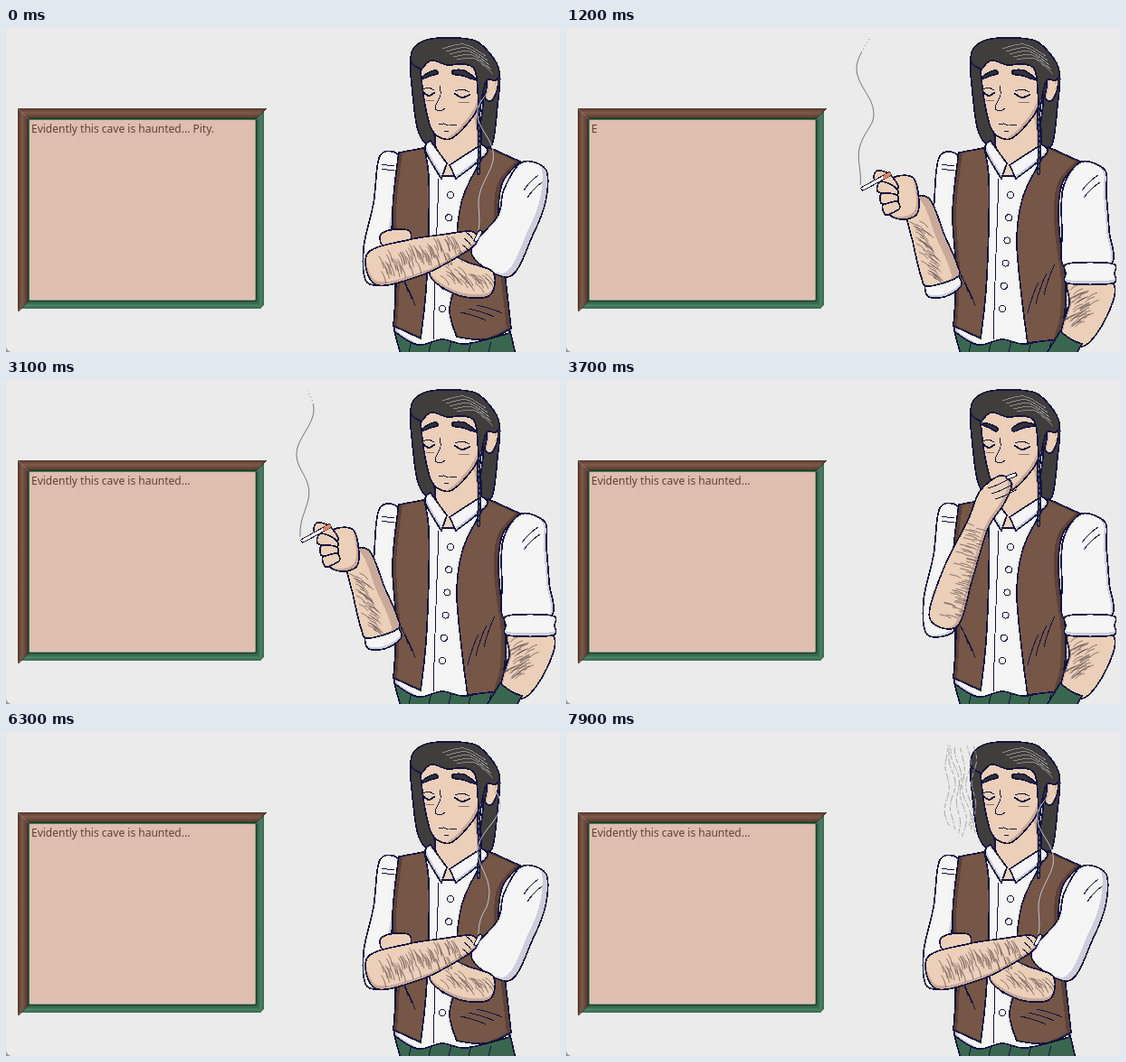
Write an HTML page that moves like this. It is 612 px wide and 359 px high and loops after 8 s.

```html
<!DOCTYPE html>
<html lang="en">
<head>
<meta charset="utf-8">
<title>Haunted cave</title>
<style>
html, body { margin: 0; width: 100%; height: 100%; overflow: hidden; background: #ebebeb; }
svg { display: block; width: 612px; height: 359px; }
#man { fill: none; stroke: #11133f; stroke-linejoin: round; stroke-linecap: round; shape-rendering: crispEdges; }
.smoke { fill: none; }
text { font: 12px "Noto Sans", sans-serif; fill: #643f38; }
</style>
</head>
<body>
<svg viewBox="0 0 612 359">
  <defs>
    <linearGradient id="brown" x2="0" y2="1"><stop stop-color="#54352b"/><stop offset=".4" stop-color="#805a4a"/><stop offset="1" stop-color="#4b2f27"/></linearGradient>
    <linearGradient id="side" href="#brown" x2="1" y2="0"/>
    <linearGradient id="green" x2="0" y2="1"><stop stop-color="#24513b"/><stop offset=".6" stop-color="#4b8062"/><stop offset="1" stop-color="#356a4d"/></linearGradient>
    <linearGradient id="edge" href="#green" x2="1" y2="0"/>
  </defs>
  <path d="M0 353Q1 358 6 359H0Z" fill="#999"/>
  <path d="M276 102L285 92V307L281 311L276 303Z" fill="url(#edge)"/>
  <path d="M25 302H276L282 311H16Z" fill="url(#green)"/>
  <path d="M13 89H288L276 101H25Z" fill="url(#brown)"/>
  <path d="M13 89L25 101V302L13 314Z" fill="url(#side)"/>
  <path d="M14 314L25 302M276 101L288 89" stroke="#2c2a22"/>
  <rect x="24.500" y="100.500" width="252" height="202" rx="2" fill="#3c7d58" stroke="#18382a"/>
  <rect x="26" y="102" width="249.500" height="199.500" rx="1" fill="#dfbdaf"/>
  <text id="say" x="28" y="116"></text>
  <g id="man"></g>
  <path id="plume" class="smoke"/>
  <path id="wisp" class="smoke" stroke="#777" stroke-dasharray="1 3"/>
  <path id="breath" class="smoke" stroke="#a9a9a9" stroke-dasharray="5 2 2 1 8 3"/>
</svg>
<script>
const $ = id => document.getElementById(id);
// Base colour and shade of each material
const paint = {
  skin: ['#ebcfb8', '#c9a99a'], shirt: ['#f5f5f6', '#cdced9'], vest: ['#755647', '#5b4138'],
  hair: ['#403d3d'], pants: ['#3a6650'], brow: ['#343238'], lip: ['#c96e67'],
};

function node(parent, tag, attrs) {
  const e = document.createElementNS('http://www.w3.org/2000/svg', tag);
  for (const k in attrs) e.setAttribute(k, attrs[k]);
  return parent.appendChild(e);
}
const layer = () => node($('man'), 'g', {});

// Smooth line through [x, y, corner] points
function spline(p, closed) {
  const n = p.length;
  const at = i => closed ? p[(i + n) % n] : p[Math.max(0, Math.min(n - 1, i))];
  const slope = (i, k) => at(i)[2] ? 0 : (at(i + 1)[k] - at(i - 1)[k]) / 6;
  let d = `M${p[0][0]} ${p[0][1]}`;
  for (let i = 0; i < (closed ? n : n - 1); i++) {
    const [ax, ay] = at(i), [bx, by] = at(i + 1);
    d += `C${ax + slope(i, 0)} ${ay + slope(i, 1)} ${bx - slope(i + 1, 0)} ${by - slope(i + 1, 1)} ${bx} ${by}`;
  }
  return d + (closed ? 'Z' : '');
}
// "x,y" points; "!" marks a corner
const points = s => s.split(' ').map(q => [...q.replace('!', '').split(',').map(Number), q.endsWith('!')]);

// Fills an outline; the shade is what a copy moved by (dx, dy) leaves bare.
let clips = 0;
function fill(g, name, d, dx = 0, dy = 0) {
  const [main, shade = main] = paint[name], id = 'clip' + clips++;
  node(node(g, 'clipPath', { id }), 'path', { d });
  node(g, 'path', { d, fill: shade, stroke: 'none' });
  const inside = node(g, 'g', { 'clip-path': `url(#${id})` });
  node(inside, 'path', { d, fill: main, stroke: 'none', transform: `translate(${dx} ${dy})` });
  node(g, 'path', { d, 'stroke-width': 1.700 });
}
const shape = (g, name, s, dx, dy) => fill(g, name, spline(points(s), true), dx, dy);

// Tapered limb along "x,y,radius" stations
function limb(g, name, s, dx, dy) {
  const p = s.split(' ').map(q => q.split(',').map(Number));
  const side = sign => p.map(([x, y, r], i) => {
    const a = p[Math.max(0, i - 1)], b = p[Math.min(p.length - 1, i + 1)];
    const turn = Math.atan2(b[1] - a[1], b[0] - a[0]) + sign * Math.PI / 2;
    return [x + r * Math.cos(turn), y + r * Math.sin(turn)];
  });
  fill(g, name, spline([...side(1), ...side(-1).reverse()], true), dx, dy);
}
const line = (g, s, attrs) => node(g, 'path', { d: spline(points(s)), ...attrs });

// n parallel creases
function folds(g, n, x, y, dx, dy, stepX, stepY) {
  for (let i = 0; i < n; i++) node(g, 'path', { d: `M${x + i * stepX} ${y + i * stepY}q${dx * .6} ${dy * .4} ${dx} ${dy}` });
}
// Short bent hairs scattered between a and b
function fuzz(g, [ax, ay], [bx, by], width, count, hx, hy) {
  let seed = 7, d = '';
  const rnd = () => (seed = seed * 16807 % 2147483647) / 2147483647;
  const len = Math.hypot(bx - ax, by - ay), nx = (ay - by) / len, ny = (bx - ax) / len;
  for (let i = 0; i < count; i++) {
    const t = (i + rnd()) / count, o = (rnd() - .5) * width;
    d += `M${ax + (bx - ax) * t + nx * o} ${ay + (by - ay) * t + ny * o}q${hx * .7} ${hy * .3} ${hx} ${hy}`;
  }
  node(g, 'path', { d, stroke: '#5d4d4d', 'stroke-width': .7 });
}
function cigarette(g, s) {
  line(g, s, { 'stroke-width': 5 });
  line(g, s, { 'stroke-width': 3, stroke: '#fff' });
}

// Torso, with sleeves behind the vest
const back = layer(), bent = layer(), raised = layer(), torso = layer();
limb(back, 'hair', '453,36,6 456,80,6 463,112,8 471,130,4');
limb(back, 'hair', '537,50,8 535,85,8 530,128,7');
shape(back, 'skin', '474,110! 475,134 482,166! 496,164! 524,132 521,92!', -5, 3);
shape(back, 'pants', '429,336! 557,336! 563,362! 436,362!');
folds(back, 5, 448, 348, -3, 12, 22, 0);
shape(back, 'shirt', '464,132! 482,164! 495,164! 532,134! 556,338! 508,350 482,345 455,351 429,336! 433,140!', 4, 0);
line(back, '478,167 475,250 472,346');

limb(bent, 'shirt', '424,143,11 418,195,12 409,245,14 414,280,15', -3, -2);
limb(raised, 'shirt', '424,143,11 419,190,12 421,260,15', -3, 0);
[bent, raised].forEach(g => folds(g, 2, 429, 153, -14, -2, 0, 5));

shape(torso, 'vest', '434,138! 462,133! 467,165 467,220 464,290 458,344! 428,330! 431,270 427,205', 4, 0);
folds(torso, 3, 432, 266, 12, 26, 4, 8);
const tails = [layer(), layer()];
const panel = '533,132! 568,148! 549,170 544,200 546,235 552,280';
shape(tails[0], 'vest', panel + ' 558,333! 530,345 498,342! 490,312 498,275 498,230 504,190 519,157!', -5, 0);
shape(tails[1], 'vest', panel + ' 550,323 543,345! 510,349! 503,295 498,235 504,190 519,157!', -5, 0);
folds(tails[0], 3, 502, 315, 28, 9, 9, -4);
folds(tails[1], 3, 540, 262, -12, 34, -9, 10);

// Collar, buttons and head
const front = layer();
for (let i = 0; i < 6; i++) node(front, 'circle', { cx: 491 - i * 1.800, cy: 185 + i * 25.200, r: 3.500, fill: '#f5f5f6' });
shape(front, 'shirt', '469,125! 463,135 481,167! 487,150!', 2, -2);
shape(front, 'shirt', '525,129! 531,139 497,167! 490,152!', -2, -2);
shape(front, 'skin', '457,36! 462,80 470,112 484,123 497,119 518,95 526,72 524,38!', -4, -1);
limb(front, 'skin', '537,54,5 537,66,6 533,79,4', 2, 0);
shape(front, 'hair', '459,46! 448,38 450,23 465,13 490,11 518,14 536,30 545,48 541,58 530,60 522,100! 519,50 506,40 488,41 470,36');
for (let i = 0; i < 5; i++)
  line(front, `${482 + i * 4},${23 + i * 3} ${506 + i * 3},${18 + i * 4} ${530 + i * 2},${31 + i * 5}`, { stroke: '#8c8b8b' });
for (const [x, y, w] of [[467, 72, 6], [504, 74, 8]]) {
  line(front, `${x - w},${y - 1} ${x},${y + 3} ${x + w},${y}`, { 'stroke-width': 2 });
  line(front, `${x - w},${y - 4} ${x},${y - 6} ${x + w},${y - 3}`);
  line(front, `${x - w / 2},${y + 9} ${x + w},${y + 8}`, { stroke: '#8b6f68' });
}
line(front, '479,64 480,74 474,88 479,92 485,89');
for (const y of [61, 67]) node(front, 'circle', { cx: 541, cy: y, r: 1.500, fill: '#eeb03c', stroke: 'none' });
const braid = '524,80 522,100 523,125 522,161';
line(front, braid, { 'stroke-width': 4 });
line(front, braid, { 'stroke-width': 1.500, stroke: '#5d5b62', 'stroke-dasharray': '2 4' });

const shut = layer(), talk = layer(), calm = layer(), stern = layer();
line(shut, '478,107 484,106 489,108 498,107');
shape(talk, 'lip', '478,109 484,106 490,109 485,112');
line(front, '484,114 489,114');
function brows(g, tilt) {
  limb(g, 'brow', `461,${52 + tilt},1 468,51,2 476,${52 - tilt},2`);
  limb(g, 'brow', `494,${52 - tilt},2 505,50,3 517,${53 + tilt},1`);
}
brows(calm, 3);
brows(stern, -3);

// Folded arms
const cross = layer();
limb(cross, 'shirt', '583,153,14 573,186,24 563,218,22 535,262,25', -6, -4);
folds(cross, 2, 588, 163, -16, 17, 4, 8);
limb(cross, 'skin', '415,234,6 430,233,10 445,236,10');
limb(cross, 'skin', '475,262,14 505,278,19 536,284,13', 0, -4);
fuzz(cross, [482, 268], [530, 280], 16, 26, 9, 10);
limb(cross, 'skin', '404,267,18 450,255,21 488,243,15 517,232,7', 1, -4);
fuzz(cross, [412, 260], [500, 236], 24, 60, 5, 13);
folds(cross, 3, 508, 226, 8, 8, -2, 7);
cigarette(cross, '519,235 524,226');

// Hand in pocket
const pocket = layer();
limb(pocket, 'skin', '580,280,24 577,312,22 560,346,14', 2, 0);
fuzz(pocket, [579, 289], [564, 326], 30, 42, -10, 6);
shape(pocket, 'pants', '546,336! 558,345 570,350! 563,362! 530,362!');
limb(pocket, 'shirt', '582,153,14 573,180,24 574,225,26 577,264,25', -3, 0);
limb(pocket, 'shirt', '579,261,24 579,272,27 579,283,24', 0, -4);
folds(pocket, 2, 588, 163, -18, 17, 2, 8);

// Raised cigarette
const raise = layer();
limb(raise, 'shirt', '399,291,7 416,287,11 433,278,8', -1, -3);
limb(raise, 'skin', '388,192,13 401,235,18 412,268,21 416,281,17', -9, 3);
fuzz(raise, [386, 213], [405, 278], 15, 40, 9, 7);
limb(raise, 'skin', '354,188,14 368,188,24 387,186,18', -3, -3);
for (let i = 0; i < 4; i++) limb(raise, 'skin', `${342 + i * 3},${163 + i * 13},5 ${354 + i},${167 + i * 11},6 ${364 + i},${178 + i * 6},4`);
cigarette(raise, '328,178 357,162');
line(raise, '352,165 357,162', { 'stroke-width': 4, stroke: '#e8825e' });

// Hand at the mouth
const drag = layer();
limb(drag, 'skin', '417,268,16 433,215,17 455,160,12 470,131,15 486,111,8', -4, -1);
fuzz(drag, [448, 160], [422, 264], 23, 48, 12, 4);
folds(drag, 3, 466, 120, 24, -11, 4, 6);
cigarette(drag, '488,108 496,105');

const speech = 'Evidently this cave is haunted...';
const show = (g, on) => g.style.display = on ? '' : 'none';
const ticks = ms => Math.floor(ms * .007 + .11);
const wave = (y, crest) => Math.cos((y - crest) * Math.PI / 50);

function trail(from, to, x) {
  let d = '';
  for (let y = from; y >= to; y -= 3) d += `${d ? 'L' : 'M'}${x(y).toFixed(1)} ${y}`;
  return d;
}
function breath(f) {
  const left = 421 + 52 * (1 - f) ** 2.600, top = 12 + 88 * (1 - f), width = 12 + 18 * f;
  let d = '';
  for (let i = 0; i < 7; i++)
    d += trail(104 + i % 4 * 4, top + i * 3 % 7, y => left + width * i / 6 + 2.500 * Math.sin(y / 8 + i * .7) + 2 * Math.sin(y / 19 - i) + (y - 60) * .06);
  return d;
}

function render(ms) {
  const t = Math.floor(ms / 100) * 100, k = (t - 1200) / 100;
  const pose = t < 1200 || t >= 5000 ? cross : t < 3700 ? raise : drag;
  const folded = pose === cross, open = pose === raise && t < 2800 && k % 4 > 1;
  $('say').textContent = t < 1200 ? speech + ' Pity.' : speech.slice(0, 1 + Math.floor(k * 2.200));

  [cross, raise, drag].forEach(g => show(g, g === pose));
  show(bent, pose !== raise);
  show(raised, pose === raise);
  show(pocket, !folded);
  show(tails[0], folded);
  show(tails[1], !folded);
  show(talk, open);
  show(shut, !open && pose !== drag);
  show(calm, pose !== drag);
  show(stern, pose === drag);

  let plume = '', wisp = '';
  if (folded) {
    const crest = 195 - 12.500 * (t < 1200 ? 4 + ticks(t) : ticks(t - 5000));
    plume = trail(224, 60, y => {
      const up = 195 - y, sway = 5 + up * .055 + (5 + up * .07) * wave(y, crest);
      return 522 + sway * Math.min(1, (224 - y) / 30);
    });
  } else if (pose === raise) {
    const crest = 95 - 12.500 * Math.max(0, ticks(t - 800) - 3);
    const x = y => 325 + (5.500 + 9.500 * wave(y, crest)) * Math.min(1, (174 - y) / 70);
    plume = trail(174, 27, x);
    wisp = trail(27, 12, x);
  }
  $('plume').setAttribute('d', plume);
  $('plume').setAttribute('stroke', folded ? '#c3c3c8' : '#777');
  $('wisp').setAttribute('d', wisp);
  $('breath').setAttribute('d', t >= 6900 ? breath((t - 6800) / 1100) : '');
}

const start = performance.now();
function frame() {
  render((performance.now() - start) % 8000);
  requestAnimationFrame(frame);
}
frame();
</script>
</body>
</html>
```
